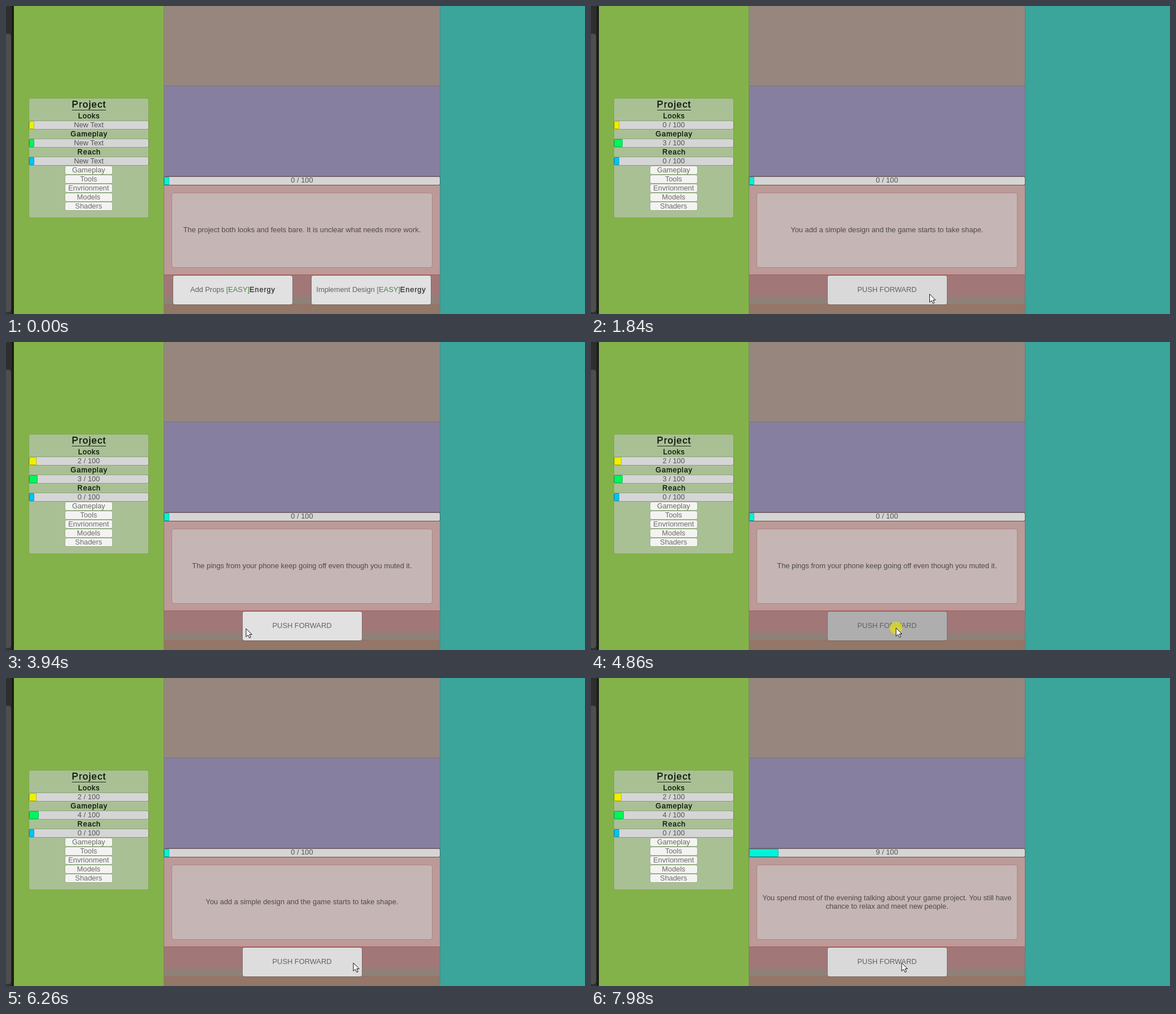
An HTML page for the animation above (8 s loop, 1025 by 546 pixels).

```html
<!DOCTYPE html>
<html lang="en">
<head>
<meta charset="utf-8">
<title>Project panel</title>
<style>
  html, body { margin: 0; width: 100%; height: 100%; overflow: hidden; }
  #stage {
    position: relative; width: 1025px; height: 546px; overflow: hidden; background: #84b24a;
    font: 12.85px/14.7px "Liberation Sans", Arial, sans-serif; color: #555;
  }
  #stage div {
    position: absolute; box-sizing: border-box; display: flex;
    align-items: center; justify-content: center; text-align: center; white-space: nowrap;
  }
  #stage .bar { background: #d5d5d6; border-radius: 2px; box-shadow: 0 0 0 .5px #0005; }
  #stage .fill { border-radius: 2px; box-shadow: inset 0 0 0 .5px #0006; }
  #stage .small { background: #f3f4f2; border-radius: 2.5px; color: #6a6a6a; box-shadow: 0 0 0 .5px #0003; }
  #stage .button { border-radius: 3px; color: #626262; box-shadow: 0 0 0 .5px #0004; }
  #stage .head { color: #0c120a; }
  .head, b { font-weight: normal; letter-spacing: .066em; -webkit-text-stroke: .35px currentColor; }
  b { color: #383838; }
  .easy { color: #4d7f4b; }
  .veasy { color: #5c7a5c; }
  .med { color: #f4715f; }
  #pointer { position: absolute; left: 0; top: 0; overflow: visible; }
</style>
</head>
<body>
<div id="stage"></div>
<script>
const LOOP = 8000, FADE = 100;
const stage = document.getElementById('stage');

function box(x, y, w, h, { bg = '', cls = '', html = '', css = '' } = {}) {
  const el = document.createElement('div');
  el.className = cls;
  el.style.cssText = `left:${x}px;top:${y}px;width:${w}px;height:${h}px;${bg && `background:${bg};`}${css}`;
  el.innerHTML = html;
  stage.append(el);
  return el;
}

// Window edge with its scrollbar
box(0, 0, 14, 546, { bg: '#2d2e2d' });
box(10, 0, 4, 546, { bg: '#1b1d19' });
box(-2, 49, 11, 494, { bg: '#4e4e4e', css: 'border-radius:5px' });

// Middle and right columns
box(279, 0, 490, 142, { bg: '#96867e' });
box(279, 142, 490, 160, { bg: '#867f9f' });
box(279, 302, 490, 16, { bg: '#7d6a70' });
box(279, 529, 490, 17, { bg: '#937769' });
box(279, 477, 490, 38, { bg: '#a17778' });
box(279, 515, 490, 14, { bg: '#8f8178' });
box(279, 318, 490, 159, { bg: '#bc9a97', css: 'border-radius:0 0 3px 3px' });
for (const [y, color] of [[141, '#8c6f69'], [301, '#776c7c'], [317, '#865f5e'], [476, '#a65a58'], [528, '#997066']])
  box(279, y, 490, 1, { bg: color });
box(769, 0, 256, 546, { bg: '#3ba49b' });
box(279, 0, 1, 546, { bg: '#6d8f52' });
box(768, 0, 1, 546, { bg: '#52857c' });

// Project panel
box(41, 164, 211, 211, { bg: '#a9c095', css: 'border-radius:3px;box-shadow:0 0 0 .5px #0002' });
box(41, 164, 212, 23, { cls: 'head', html: 'Project', css: 'font-size:17px' });
box(117, 183.5, 60, 1, { bg: '#26301f' });

function meter(x, y, w, h, color) {
  box(x, y, w, h, { cls: 'bar' });
  const fill = box(x, y, 9, h, { cls: 'fill', bg: color });
  const label = box(x, y, w, h);
  return (value, text) => {
    fill.style.width = 9 + (w - 9) * value / 100 + 'px';
    label.textContent = text || value + ' / 100';
  };
}

const stats = [['Looks', '#eff000'], ['Gameplay', '#00f45d'], ['Reach', '#00c4f5']].map(([name, color], i) => {
  box(41, 187 + 32 * i, 212, 16, { cls: 'head', html: name });
  return meter(41, 204 + 32 * i, 211, 14, color);
});
['Gameplay', 'Tools', 'Envrionment', 'Models', 'Shaders'].forEach((name, i) =>
  box(104.5, 284 + 16 * i, 83.5, 14, { cls: 'small', html: name }));

const energy = meter(280, 302.5, 488, 14, '#00f3da');
const message = box(294, 332, 460, 131, {
  bg: '#c6b5b5', css: 'color:#4d4949;border-radius:3px;box-shadow:0 0 0 .5px #7a505080'
});

const [left, right, push] = [296, 541, 418.5].map(x => ({ x, el: box(x, 478, 211, 51, { cls: 'button' }) }));
push.el.textContent = 'PUSH FORWARD';

const cost = (cls, tag) => `<span><span class="${cls}">[${tag}]</span><b>Energy</b></span>`;
const line = (text, tag) => `<span>${text} ${tag}</span>`;
const bare = {
  text: 'The project both looks and feels bare. It is unclear what needs more work.',
  options: [line('Add Props', cost('easy', 'EASY')), line('Implement Design', cost('easy', 'EASY'))]
};
const blank = {
  text: 'You are staring at a blank project. Your phone pings and everyone is going to the<br>pub.',
  options: [line('Start a new Envrionment<br>', cost('med', 'MED')), line('Go out', cost('veasy', 'V.EASY'))]
};
const designed = { text: 'You add a simple design and the game starts to take shape.' };
const muted = { text: 'The pings from your phone keep going off even though you muted it.' };
const evening = {
  text: 'You spend most of the evening talking about your game project. You still have<br>chance to relax and meet new people.'
};

// start time, page, [looks, gameplay, reach], energy
const scenes = [
  [0, bare, null, 0],
  [1430, designed, [0, 3, 0], 0],
  [2550, blank, [0, 3, 0], 0],
  [3940, muted, [2, 3, 0], 0],
  [5220, bare, [2, 3, 0], 0],
  [5810, designed, [2, 4, 0], 0],
  [6770, blank, [2, 4, 0], 0],
  [7470, evening, [2, 4, 0], 9]
];

// Pointer moves: start, end, x, y
const moves = [
  [650, 1000, 624, 511], [1770, 1970, 539, 510], [2550, 2790, 425, 508], [3950, 4350, 540, 507],
  [5230, 5610, 637, 505], [6150, 6400, 584, 505], [6780, 7020, 636, 505], [7780, 7980, 550, 505]
];
const presses = [[1025, 1430], [1915, 2550], [3580, 3940], [4760, 5220], [5605, 5810], [6600, 6770], [7300, 7470]];

stage.insertAdjacentHTML('beforeend', `<svg id="pointer" width="1" height="1">
  <circle r="11" fill="#dcd62c" opacity=".86"/>
  <path d="M0 0V14.5L3.4 11.4L5.9 16.6L8.3 15.5L5.9 10.5H10.3Z" fill="#fff" stroke="#111" stroke-linejoin="round"/></svg>`);
const pointer = document.getElementById('pointer');
const halo = pointer.querySelector('circle');

function pointerAt(t) {
  let x = 657, y = 552;
  for (const [from, to, nx, ny] of moves) {
    if (t <= from) break;
    const p = Math.min(1, (t - from) / (to - from));
    const k = p * p * (3 - 2 * p);
    x += (nx - x) * k;
    y += (ny - y) * k;
  }
  return [x, y];
}

const pressedAt = t => presses.some(([from, to]) => t >= from && t < to);

function targetShade(button, t) {
  const [x, y] = pointerAt(t);
  const over = x >= button.x && x <= button.x + 211 && y >= 478 && y <= 529;
  return !over ? 225 : pressedAt(t) ? 174 : 217;
}

// Averaging the recent targets gives a linear colour fade
function shade(button, t, start) {
  const n = 20;
  let sum = 0;
  for (let i = 0; i < n; i++) {
    const at = t - i * FADE / n;
    sum += at < start ? 225 : targetShade(button, at);
  }
  return Math.round(sum / n);
}

let shown;
function showScene(scene) {
  if (scene === shown) return;
  shown = scene;
  const [, page, values, power] = scene;
  stats.forEach((set, i) => values ? set(values[i]) : set(0, 'New Text'));
  energy(power);
  message.innerHTML = `<span>${page.text}</span>`;
  const options = page.options;
  [left, right].forEach((button, i) => {
    button.el.style.visibility = options ? 'visible' : 'hidden';
    button.el.innerHTML = options ? options[i] : '';
  });
  push.el.style.visibility = options ? 'hidden' : 'visible';
}

const began = performance.now();
function draw() {
  const t = (performance.now() - began) % LOOP;
  const scene = scenes.findLast(s => s[0] <= t);
  showScene(scene);
  for (const button of [left, right, push]) {
    const v = shade(button, t, scene[0]);
    button.el.style.backgroundColor = `rgb(${v},${v},${v})`;
  }
  const [x, y] = pointerAt(t);
  pointer.style.transform = `translate(${x}px,${y}px)`;
  halo.style.visibility = pressedAt(t) ? 'visible' : 'hidden';
  requestAnimationFrame(draw);
}
draw();
</script>
</body>
</html>
```
